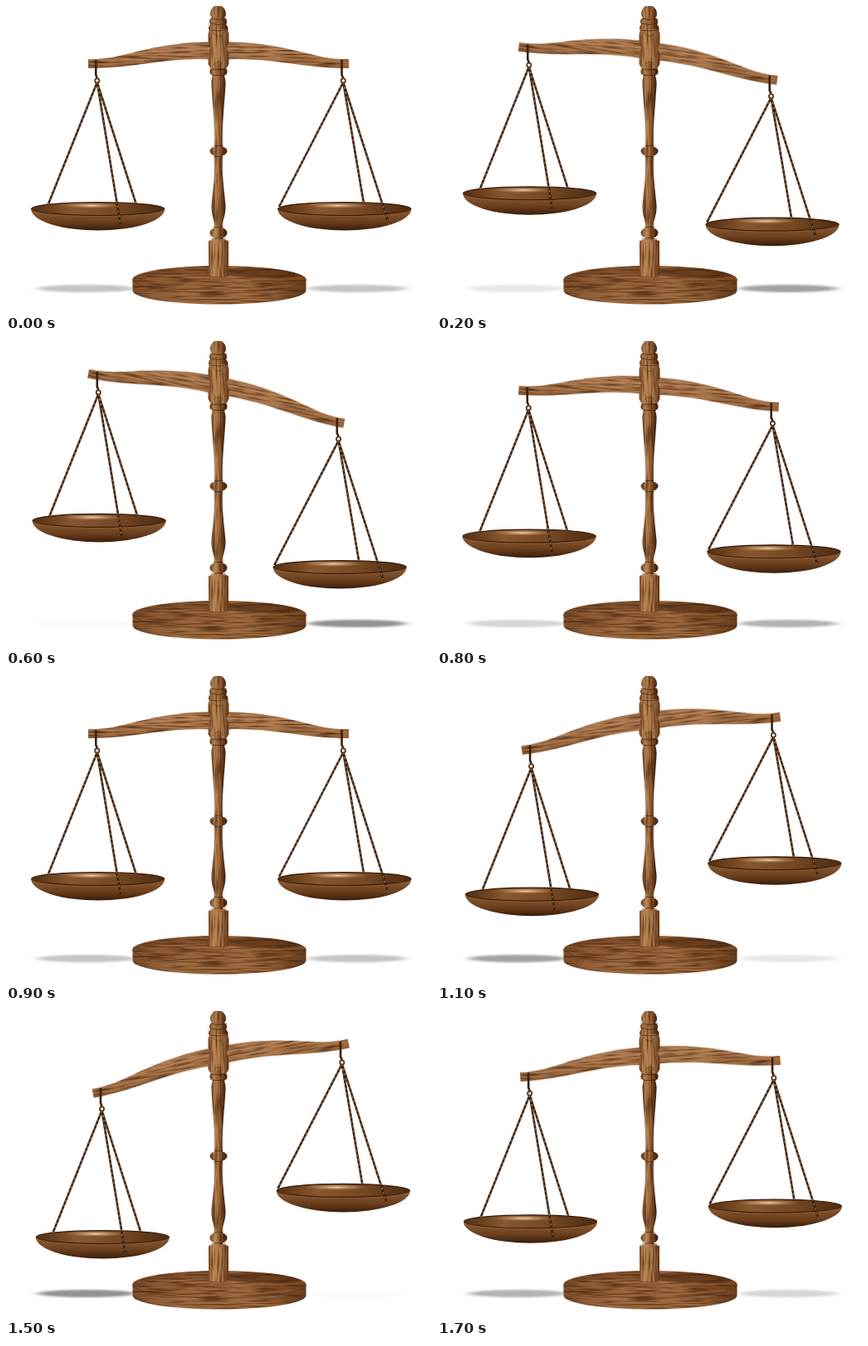
Recreate the animation shown at these times as an HTML page. Size 512 by 370 pixels, loop 1.8 s.

```html
<!DOCTYPE html>
<html lang="en">
<head>
<meta charset="utf-8">
<title>Balance scales</title>
<style>
html, body { margin: 0; height: 100%; overflow: hidden; background: #fff; }
svg { display: block; width: 512px; height: 370px; }
filter { color-interpolation-filters: sRGB; }
</style>
</head>
<body>
<svg viewBox="0 0 512 370">
  <defs>
    <linearGradient id="post">
      <stop offset="0" stop-color="#6a3f20"/><stop offset=".28" stop-color="#bd8a5b"/>
      <stop offset=".55" stop-color="#9a663b"/><stop offset=".8" stop-color="#633a1c"/>
      <stop offset="1" stop-color="#3a1f0d"/>
    </linearGradient>
    <linearGradient id="block">
      <stop offset="0" stop-color="#8c5a33"/><stop offset=".2" stop-color="#bb8656"/>
      <stop offset=".75" stop-color="#a87244"/><stop offset="1" stop-color="#5f3719"/>
    </linearGradient>
    <linearGradient id="beamFill" x2="0" y2="1">
      <stop offset="0" stop-color="#b9855a"/><stop offset=".5" stop-color="#b07c50"/>
      <stop offset="1" stop-color="#9a683f"/>
    </linearGradient>
    <linearGradient id="side">
      <stop offset="0" stop-color="#80502c"/><stop offset=".3" stop-color="#a16e43"/>
      <stop offset=".75" stop-color="#9c683d"/><stop offset="1" stop-color="#6a4020"/>
    </linearGradient>
    <linearGradient id="top">
      <stop offset="0" stop-color="#80502b"/><stop offset=".3" stop-color="#98643a"/>
      <stop offset=".6" stop-color="#a06c41"/><stop offset="1" stop-color="#774722"/>
    </linearGradient>
    <linearGradient id="bowl" x2="0" y2="1">
      <stop offset=".2" stop-color="#83542e"/><stop offset=".6" stop-color="#6b3f1d"/>
      <stop offset="1" stop-color="#391d0a"/>
    </linearGradient>
    <linearGradient id="inner">
      <stop offset="0" stop-color="#54300f"/><stop offset=".3" stop-color="#87572f"/>
      <stop offset=".65" stop-color="#754823"/><stop offset="1" stop-color="#4d2b11"/>
    </linearGradient>
    <radialGradient id="shine">
      <stop offset="0" stop-color="#f0d2b0"/><stop offset="1" stop-color="#c08a5a" stop-opacity="0"/>
    </radialGradient>
    <filter id="grainX">
      <feTurbulence type="fractalNoise" baseFrequency=".03 .45" numOctaves="2" seed="4"/>
      <feColorMatrix values="0 0 0 0 .25  0 0 0 0 .12  0 0 0 0 .03  2 0 0 0 -.85"/>
      <feComposite operator="atop" in2="SourceGraphic"/>
    </filter>
    <filter id="grainY">
      <feTurbulence type="fractalNoise" baseFrequency=".4 .03" numOctaves="2" seed="7"/>
      <feColorMatrix values="0 0 0 0 .25  0 0 0 0 .12  0 0 0 0 .03  2 0 0 0 -.85"/>
      <feComposite operator="atop" in2="SourceGraphic"/>
    </filter>
    <filter id="soft" x="-20%" y="-60%" width="140%" height="220%">
      <feGaussianBlur stdDeviation="6 .8"/>
    </filter>
    <path id="arm" d="M99 64H109C145 63 174 43 256 43V65C203 60 157 74 109 75H99Z"/>
  </defs>

  <g filter="url(#soft)" fill="#0c0600">
    <ellipse id="shadowL" cx="97" cy="340.5" rx="59" ry="4.5"/>
    <ellipse id="shadowR" cx="423" cy="340.5" rx="59" ry="4.5"/>
  </g>

  <g filter="url(#grainX)">
    <path fill="url(#side)" d="M152.500 329.500V343A104.500 16.500 0 0 0 361.500 343V329.500Z"/>
    <ellipse fill="url(#top)" cx="257" cy="329.500" rx="104.500" ry="16.500"/>
    <path fill="#4a2710" opacity=".55" d="M268 316C300 313 340 317 357 325C340 330 300 328 268 325Z"/>
    <path fill="#4a2710" opacity=".3" d="M160 325C180 317 215 314 244 314V324C215 320 185 326 160 325Z"/>
  </g>
  <path fill="none" stroke="#5d371b" opacity=".7" d="M152.500 329.500A104.500 16.500 0 0 0 361.500 329.500"/>

  <g id="beam">
    <g fill="url(#beamFill)" filter="url(#grainX)">
      <use href="#arm"/>
      <use href="#arm" transform="matrix(-1 0 0 1 512 0)"/>
    </g>
  </g>

  <g fill="url(#post)" filter="url(#grainY)">
    <path d="M255-2C262 0 265 5 265 9Q265 13 263 14L266 17V20L265 22Q268 25 267.500 29H244.500Q243 25 246 22L245 20V17L248 14Q246 13 246 9C246 5 249 0 255-2Z"/>
    <path fill="url(#block)" d="M245 28H267L268.500 34V44L266 51 268.500 58V70L265 76H247L243.500 70V58L246 51 243.500 44V34Z"/>
    <rect x="245.500" y="75" width="21" height="8" rx="3.500"/>
    <path d="M249 82H263C263 86 265 88 264.500 95C263 122 260 145 261 170H251C252 145 249 122 247.500 95C247 88 249 86 249 82Z"/>
    <path d="M251 180H261C260 205 263 222 264.500 240C265 254 260 258 261 268V285H251V268C252 258 247 254 247.500 240C249 222 252 205 251 180Z"/>
    <ellipse cx="256" cy="175" rx="10.500" ry="6.500"/>
    <ellipse cx="256" cy="273.500" rx="10.500" ry="7"/>
    <path fill="url(#block)" d="M244 283Q256 278 268 283V325Q256 328 244 325Z"/>
  </g>
  <g fill="none" stroke="#3d200c" opacity=".65">
    <path d="M245 29Q256 31 267 29M246 15Q256 18 266 15M246 21Q256 24 266 21M247 76Q256 78 265 76M248 83.500H264M251 168.500H261M251 181.500H261M250 266.500H262M247 281Q256 278 265 281"/>
    <path d="M248 31Q256 42 264 31M248 73Q256 62 264 73" opacity=".5"/>
  </g>

  <g id="panL"></g>
  <g id="panR"></g>
</svg>
<script>
const $ = id => document.getElementById(id);
const STEP_MS = 100, HALF = 9, STEP_DEG = 3.68;

// A pan hanging from its ring; cords lists the end points of the strings.
function drawPan(id, hook, ring, cx, cords) {
  const d = cords.map(([x, y]) => `M${ring} 92L${x} ${y}`).join('');
  $(id).innerHTML = `
    <path fill="url(#bowl)" d="M${cx - 80.5} 244.500A80.500 26 0 0 0 ${cx + 80.5} 244.500Z"/>
    <ellipse cx="${cx}" cy="244.500" rx="80" ry="8" fill="url(#inner)" stroke="#32190a" stroke-width="1.200"/>
    <ellipse cx="${cx - 8}" cy="240.500" rx="38" ry="3.500" fill="url(#shine)"/>
    <path fill="none" stroke="#9a683c" opacity=".6" d="M${cx - 80} 245A80 8.500 0 0 0 ${cx + 80} 245"/>
    <path fill="none" stroke="#3b2213" stroke-width="2.600" d="${d}"/>
    <path fill="none" stroke="#a37748" stroke-width="1.300" stroke-dasharray="2.200 3.600" d="${d}"/>
    <path fill="none" stroke="#3a2010" stroke-width="2.600" d="M${hook} 65V83L${ring} 87"/>
    <circle cx="${ring}" cy="90" r="2.600" fill="none" stroke="#5a3519" stroke-width="1.800"/>`;
}

function hang(side, dir, n) {
  const dx = -dir * 1.2 * Math.abs(n) - 0.7 * n;
  $('pan' + side).setAttribute('transform', `translate(${dx} ${dir * 9.35 * n})`);
  $('shadow' + side).setAttribute('opacity', Math.max(0, 0.23 + 0.07 * dir * n));
}

function frame(now) {
  const s = Math.floor(now / STEP_MS) % (2 * HALF), h = s % HALF;
  const n = Math.min(h, HALF - h) * (s < HALF ? 1 : -1);
  $('beam').setAttribute('transform', `rotate(${n * STEP_DEG} 256 55)`);
  hang('L', -1, n);
  hang('R', 1, n);
  requestAnimationFrame(frame);
}

drawPan('panL', 108.3, 109.8, 110.7, [[50.5, 240], [138, 264], [156.5, 238]]);
drawPan('panR', 404.5, 406.3, 407.8, [[329, 242], [431, 238], [460, 259]]);
frame(0);
</script>
</body>
</html>
```
